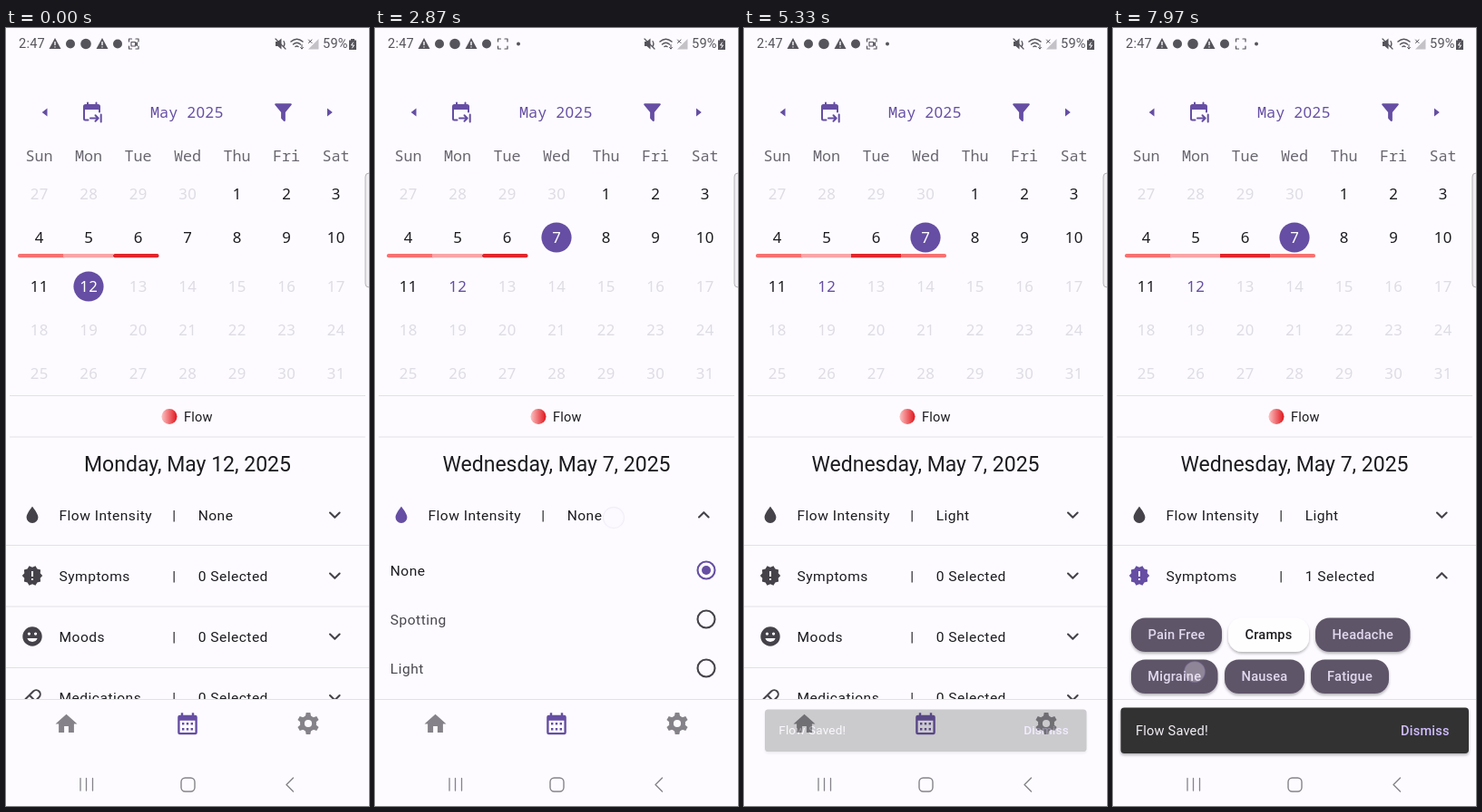
Animation of 400 by 858 pixels, one loop 8 s. Source, as an HTML page:

```html
<!DOCTYPE html>
<html lang="en">
<head>
<meta charset="utf-8">
<title>Cycle calendar</title>
<style>
html, body { margin: 0; width: 100%; height: 100%; overflow: hidden; background: #fdfbff; }
svg { display: block; width: 400px; height: 858px; }
text { font-family: Roboto, sans-serif; fill: #1c1b1f; }
.mid { text-anchor: middle; }
.mono { font: 16.8px "Noto Sans Mono", monospace; }
.num { font: 16.8px "Noto Sans", sans-serif; letter-spacing: .45px; }
.row { font-size: 15.55px; letter-spacing: .486px; }
.title { font-size: 23px; }
.small { font-size: 14.6px; letter-spacing: .2px; }
.bold { font-weight: 500; }
.rule { stroke: #e3e0e7; }
.line { fill: none; stroke-linecap: round; stroke-linejoin: round; }

.step { animation: 8s step-end infinite; }
.pre { animation-name: pre; }
.post { animation-name: post; }
.idle { animation-name: idle; }
.flow { animation-name: flow; }
.notflow { animation-name: notflow; }
.symptoms { animation-name: symptoms; }
.none { animation-name: none-set; }
.light { animation-name: light-set; }
.saved { animation-name: saved; }
.unsaved { animation-name: unsaved; }
.zero { animation-name: zero; }
.one { animation-name: one; }
.blink { animation: blink 1s step-end infinite; }
.dot { animation: dot 8s linear infinite; }
.snack { animation: snack 8s ease-out infinite; transform-box: fill-box; transform-origin: center; }
.spot { animation: spot 8s step-end infinite; }
.tap { animation: tap 8s linear infinite; }

@keyframes pre { 0% { opacity: 1 } 21.25%, 100% { opacity: 0 } }
@keyframes post { 0% { opacity: 0 } 21.25%, 100% { opacity: 1 } }
@keyframes idle { 0%, 66.25% { opacity: 1 } 34.2%, 76.6%, 100% { opacity: 0 } }
@keyframes flow { 0%, 66.25%, 100% { opacity: 0 } 34.2% { opacity: 1 } }
@keyframes notflow { 0%, 66.25%, 100% { opacity: 1 } 34.2% { opacity: 0 } }
@keyframes symptoms { 0% { opacity: 0 } 76.6%, 100% { opacity: 1 } }
@keyframes none-set { 0% { opacity: 1 } 51.25%, 100% { opacity: 0 } }
@keyframes light-set { 0% { opacity: 0 } 51.25%, 100% { opacity: 1 } }
@keyframes saved { 0% { opacity: 0 } 66.25%, 100% { opacity: 1 } }
@keyframes unsaved { 0% { opacity: 1 } 66.25%, 100% { opacity: 0 } }
@keyframes zero { 0% { opacity: 1 } 87.9%, 100% { opacity: 0 } }
@keyframes one { 0% { opacity: 0 } 87.9%, 100% { opacity: 1 } }
@keyframes blink { 0% { opacity: 1 } 50%, 100% { opacity: 0 } }
@keyframes dot { 0%, 1.2% { opacity: 0 } 3.3%, 100% { opacity: 1 } }
@keyframes snack {
  0%, 66.25% { opacity: 0; transform: scale(.9) }
  68.75%, 100% { opacity: 1; transform: none }
}
@keyframes spot {
  0% { transform: translate(200px, 231px) }
  28% { transform: translate(263px, 540px) }
  45% { transform: translate(290px, 706px) }
  57% { transform: translate(298px, 538px) }
  70% { transform: translate(298px, 604px) }
  82% { transform: translate(175px, 671px) }
  94%, 100% { transform: translate(90px, 710px) }
}
@keyframes tap {
  0%, 18.9%, 23.6%, 30.3%, 36.4%, 49.9%, 55%, 58.6%, 63.4%, 75%, 78.6%, 85.4%, 89.8%, 97.3%, 100% { opacity: 0 }
  19.6%, 22%, 31%, 34%, 50.6%, 53%, 60%, 61.8%, 75.8%, 77%, 85.8%, 88.2% { opacity: 1 }
  98.2%, 99.99% { opacity: .5 }
}
</style>
</head>
<body>
<svg id="stage" viewBox="0 0 400 858"></svg>
<script>
const purple = '#654ea3', ink = '#45424a', grey = '#858389';
const glyph = {
  drop: 'M12 20.8a6.3 6.3 0 0 1-6.3-6.4C5.700 10.500 12 3 12 3s6.300 7.500 6.300 11.400A6.300 6.300 0 0 1 12 20.800z',
  alert: 'M23 12l-2.440-2.780.340-3.680-3.610-.820-1.890-3.180L12 3 8.600 1.540 6.710 4.720l-3.610.810.340 3.680L1 12l2.440 2.780-.340 3.690 3.610.820 1.890 3.180L12 21l3.400 1.460 1.890-3.180 3.610-.820-.340-3.680zM13 17h-2v-2h2zm0-4h-2V7h2z',
  smile: 'M12 1.500a10.500 10.500 0 1 0 0 21 10.500 10.500 0 0 0 0-21zM8.500 7.500a1.600 1.600 0 1 1 0 3.200 1.600 1.600 0 0 1 0-3.200zm7 0a1.600 1.600 0 1 1 0 3.200 1.600 1.600 0 0 1 0-3.200zM6.500 14h11a5.900 5.900 0 0 1-11 0z',
  home: 'M10 20v-6h4v6h5v-8h3L12 3 2 12h3v8z',
  month: 'M19 3h-1V1h-2v2H8V1H6v2H5a2 2 0 0 0-2 2v14a2 2 0 0 0 2 2h14a2 2 0 0 0 2-2V5a2 2 0 0 0-2-2zm0 16H5V8h14zM7 10h2v2H7zm4 0h2v2h-2zm4 0h2v2h-2zM7 15h2v2H7zm4 0h2v2h-2zm4 0h2v2h-2z',
  funnel: 'M4.500 3h15q2 0 .800 1.700L14.200 12v8q-.300 1.900-1.900.700l-2-2q-.500-.500-.500-1.200V12L3.700 4.700Q2.500 3 4.500 3z'
};

const icon = (name, x, y, size, fill = ink) =>
  `<path d="${glyph[name]}" fill="${fill}" fill-rule="evenodd" transform="translate(${x} ${y}) scale(${size}) translate(-12 -12)"/>`;
const text = (s, x, y, cls = 'row', fill = '#1c1b1f') =>
  `<text x="${x}" y="${y}" class="${cls}" style="fill:${fill}">${s}</text>`;
const line = (d, color, width) =>
  `<path class="line" d="${d}" stroke="${color}" stroke-width="${width}"/>`;
const step = (name, body) => `<g class="step ${name}">${body}</g>`;
const rule = (y, x = 0) => `<path class="rule" d="M${x} ${y}H${400 - x}"/>`;
const disc = (x, y, r, fill) => `<circle cx="${x}" cy="${y}" r="${r}" fill="${fill}"/>`;
const chevron = (y, up) => line(`M357 ${y + (up ? 2.5 : -2.5)}l5.300 ${up ? -5.3 : 5.3} 5.300 ${up ? 5.3 : -5.3}`, ink, 2.1);
const label = (name, y) => text(name, 58.5, y + 5.5) + text('|', 183.2, y + 5.5);

function statusBar() {
  const c = '#56545b';
  const warn = x => `<path d="M${x} 11l6.500 12h-13z" fill="${c}"/>` + line(`M${x} 15.500v3M${x} 21v.1`, '#fdfbff', 1.4);
  return text('2:47', 14, 22, 'small', c) + warn(54) + disc(71, 17.5, 5, c) + disc(88, 17.5, 5.8, c)
    + warn(106) + disc(123, 17.5, 5, c)
    + line('M135.500 15v-3h3M143 12h3v3M146 20v3h-3M138.500 23h-3v-3', c, 1.2)
    + `<g class="blink">${line('M138 15.500h4.500v4.500h-4.500zM142.500 17.500l2-1.500v3.500z', c, 1.1)}</g>`
    + `<g class="dot">${disc(158, 17.5, 2, c)}</g>`
    + `<path d="M297 15h2.500l4-3.500v12l-4-3.500H297z" fill="${c}"/>`
    + line('M297 12l11 11M306 14.500q2 3 0 6', c, 1.2)
    + line('M314 15q6.500-5.500 13 0M316.500 18q4-3.500 8 0M319 20.500q1.500-1.200 3 0', c, 1.5)
    + line('M326 18.500v4.500M324.500 21.500l1.500 1.500 1.500-1.500', c, 1)
    + '<path d="M333 23.500l11.500-11.500v11.500z" fill="#c4c2c7"/>' + line('M333.500 13l3.500 3.500m0-3.500l-3.500 3.500', c, 1)
    + text('59%', 349, 22, 'small', c)
    + `<path d="M380 12h4v1.500h2V24h-8V13.500h2z" fill="${c}"/>` + line('M382.500 16l-2 3h3l-2 3', '#fdfbff', 1);
}

function calendar() {
  const cols = [36.5, 91, 145.5, 200, 254.5, 309, 363.5], rows = [183, 231, 285, 333, 381];
  const num = (n, x, y, fill) => text(n, x + .2, y + 6, 'num mid', fill);
  const bar = (x1, x2, fill, r = 0) => `<rect x="${x1}" y="249" width="${x2 - x1}" height="4.300" rx="${r}" fill="${fill}"/>`;
  let out = `<path d="M45.500 88.500v9l-5.800-4.500zM354 88.500v9l5.800-4.500z" fill="${purple}"/>`
    + line('M90.500 101.500H87.500Q86 101.500 86 100V86.500q0-1.500 1.500-1.500h14q1.500 0 1.500 1.500v6M90 82.500v3M99.500 82.500v3M93 99.500h8.500M98.500 96.300l3.200 3.200-3.200 3.200M104.700 95.500v8', purple, 2)
    + `<path d="M86 85.500h17v4.500H86z" fill="${purple}"/>`
    + text('May', 159, 99, 'mono', purple) + text('2025', 199.5, 99, 'num', purple)
    + icon('funnel', 305.5, 93, 1.08, purple);
  ['Sun', 'Mon', 'Tue', 'Wed', 'Thu', 'Fri', 'Sat'].forEach((d, i) => out += text(d, cols[i], 147, 'mono mid', '#69666f'));

  out += bar(13, 66, '#f87171', 2) + bar(63, 118, '#f9a5a8')
    + step('unsaved', bar(118, 168.5, '#e0262c', 2))
    + step('saved', bar(172, 223, '#f87171', 2) + bar(118, 173, '#e0262c'));
  for (let i = 0; i < 35; i++) {
    const n = i - 3, x = cols[i % 7], y = rows[Math.floor(i / 7)];
    const picked = disc(x, y, 16.6, purple) + num(n, x, y, '#fff');
    if (n === 12) out += step('pre', picked) + step('post', num(n, x, y, purple));
    else if (n === 7) out += step('pre', num(n, x, y, '#1c1b1f')) + step('post', picked);
    else out += num(n < 1 ? 30 + n : n, x, y, n < 1 || n > 12 ? '#dedce4' : '#1c1b1f');
  }
  return out + rule(405.5, 4) + rule(451, 4) + disc(180, 428.5, 8.5, 'url(#heat)')
    + text('Flow', 196, 434, 'small')
    + step('pre', text('Monday, May 12, 2025', 200, 488.5, 'title mid'))
    + step('post', text('Wednesday, May 7, 2025', 200, 488.5, 'title mid'));
}

function option(name, y, onClass, offClass) {
  const ring = c => `<circle cx="365" cy="${y}" r="9.500" fill="none" stroke="${c}" stroke-width="2.100"/>`;
  const off = text(name, 16.8, y + 5.5, 'row', '#49464e') + ring(ink);
  const on = text(name, 16.8, y + 5.5) + ring(purple) + disc(365, y, 5, purple);
  return onClass ? step(onClass, on) + step(offClass, off) : off;
}

function chip(name, x, y, width) {
  const box = fill => `<rect x="${x}" y="${y}" width="${width}" height="37.500" rx="15.500" fill="${fill}" filter="url(#lift)"/>`;
  const face = (fill, color) => box(fill) + text(name, x + width / 2, y + 23.5, 'small bold mid', color);
  const plain = face('#5f5469', '#e2d8ee');
  return name === 'Cramps' ? step('zero', plain) + step('one', face('#fffeff', '#1c1b1f')) : plain;
}

function list() {
  const count = (y, n = 0) => text(n + ' Selected', 211.7, y + 5.5);
  const pill = `<g transform="rotate(-45 29 739)">${line('M23 734.500h12a4.500 4.500 0 0 1 0 9H23a4.500 4.500 0 0 1 0-9zM29 734.500v9', ink, 2)}</g>`;
  return label('Flow Intensity', 537)
    + step('none', text('None', 211.7, 542.5)) + step('light', text('Light', 211.7, 542.5))
    + step('notflow', icon('drop', 29, 537, 1.02) + chevron(537) + rule(570.5) + label('Symptoms', 604))
    + step('flow', icon('drop', 29, 537, 1.02, purple) + chevron(537, true)
      + option('None', 598, 'none', 'light') + option('Spotting', 652) + option('Light', 706, 'light', 'none'))
    + step('idle', icon('alert', 29, 604, 1.02) + count(604) + chevron(604) + rule(638)
      + icon('smile', 29, 671, 1.02) + label('Moods', 671) + count(671) + chevron(671) + rule(705.5)
      + pill + label('Medications', 738.5) + count(738.5) + chevron(738.5))
    + step('symptoms', icon('alert', 29, 604, 1.02, purple) + chevron(604, true)
      + step('zero', count(604)) + step('one', count(604, 1))
      + chip('Pain Free', 20, 650.5, 100) + chip('Cramps', 127, 650.5, 89) + chip('Headache', 223, 650.5, 104.5)
      + chip('Migraine', 20, 696.5, 95.5) + chip('Nausea', 123, 696.5, 88) + chip('Fatigue', 218, 696.5, 86));
}

function bottom() {
  let cog = '';
  for (let a = 0; a < 360; a += 60) cog += `<path d="M-3.300-7l1-5h4.600l1 5z" transform="rotate(${a})"/>`;
  return rule(740.5) + icon('home', 66.5, 767.5, 1.2, grey) + icon('month', 200, 768.5, 1.2, purple)
    + `<g transform="translate(333 767)" fill="${grey}">${cog}${disc(0, 0, 9, grey)}${disc(0, 0, 4.1, '#fdfbff')}</g>`
    + line('M82 827.500v13.500M88.500 827.500v13.500M95.500 827.500v13.500', grey, 1.3)
    + `<rect x="193" y="827" width="15" height="15" rx="4.500" fill="none" stroke="${grey}" stroke-width="1.400"/>`
    + line('M316.500 827l-7.500 7.500 7.500 7.500', grey, 1.4)
    + `<g class="snack"><rect x="8.500" y="749.500" width="383.500" height="50.500" rx="4" fill="#313033" filter="url(#lift)"/>`
    + text('Flow Saved!', 25, 779.5, 'small" letter-spacing="0', '#f2eef5')
    + text('Dismiss', 317, 779.5, 'small bold', '#cfbcff') + '</g>';
}

document.getElementById('stage').innerHTML = `
  <defs>
    <linearGradient id="heat"><stop offset=".05" stop-color="#fbb9ba"/><stop offset="1" stop-color="#e0141b"/></linearGradient>
    <filter id="lift" x="-20%" y="-30%" width="140%" height="180%">
      <feDropShadow dx="0" dy="2" stdDeviation="1.800" flood-color="#000" flood-opacity=".28"/>
    </filter>
    <clipPath id="view"><path d="M0 450h400v290.500H0z"/></clipPath>
  </defs>
  <rect width="400" height="858" fill="#fdfbff"/>
  ${statusBar()}${calendar()}
  <g clip-path="url(#view)">${list()}</g>
  ${bottom()}
  <rect x="396" y="160" width="10" height="126" rx="4" fill="#f1eff3" stroke="#b3b1b6"/>
  <g class="spot"><circle class="tap" r="11.500" fill="#f4f0fa" fill-opacity=".65" stroke="#8672bd" stroke-opacity=".4" stroke-width="1.300"/></g>`;
</script>
</body>
</html>
```
